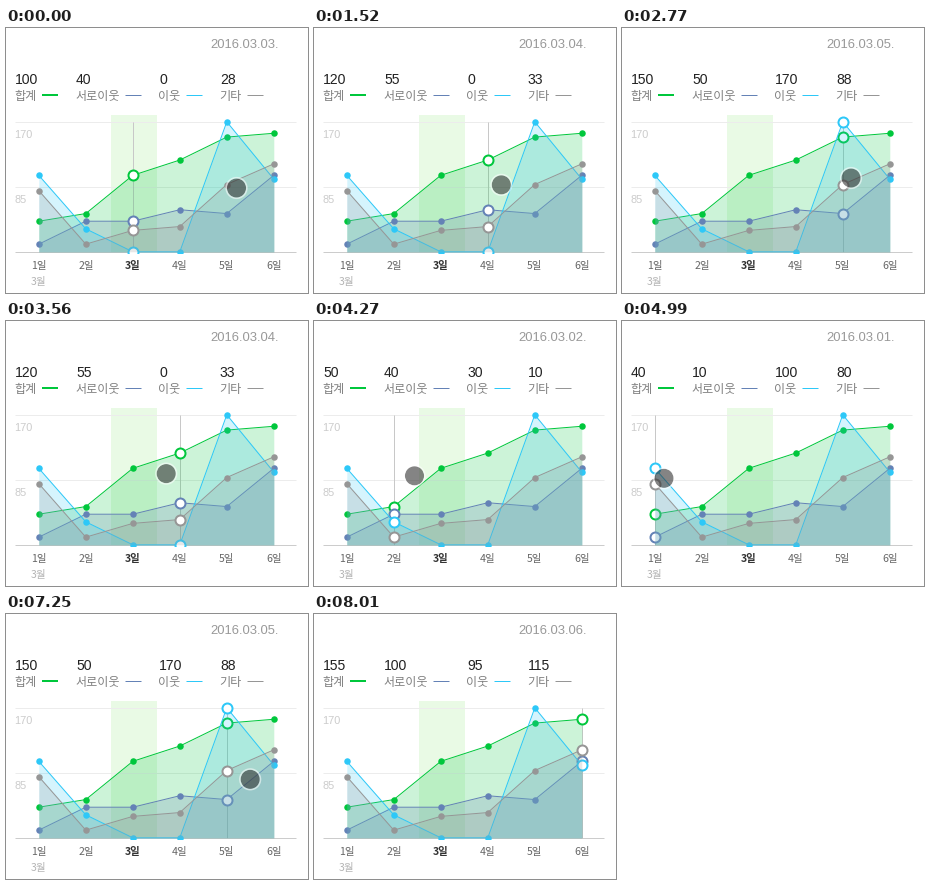
A matplotlib script that plays this animation: 302 px wide and 265 px high, repeating every 8400 ms.

```python
import matplotlib.pyplot as plt
import numpy as np
from matplotlib.animation import FuncAnimation
from matplotlib.patches import Circle, Rectangle

W, H, DPI = 302, 265, 100
PT = 72 / DPI  # points per pixel
LOOP, STEP = 8400, 30
BASE, UNIT = 223.8, 65 / 85  # baseline and pixels per count

SANS, HANGUL = "Liberation Sans", "Noto Sans CJK JP"
DAYS = 32.8 + 47 * np.arange(6)
TODAY = 2
# label, label x, colour, area opacity, daily counts
SERIES = [
    ("합계", 9, "#00c73c", .20, [40, 50, 100, 120, 150, 155]),
    ("서로이웃", 70, "#6482b6", .22, [10, 40, 40, 55, 50, 100]),
    ("이웃", 153, "#2dc8f8", .20, [100, 30, 0, 0, 170, 95]),
    ("기타", 214, "#969696", .22, [80, 10, 28, 33, 88, 115]),
]

# the pointer rests between these glides: start ms, end ms, x reached
GLIDES = [
    (400, 620, 108), (810, 890, 123.5), (1040, 1130, 128.5),
    (1290, 2170, 274), (2410, 2890, 225), (3010, 3320, 180),
    (3440, 3860, 133), (3980, 4270, 100.5), (4540, 4990, 42),
    (5360, 5670, 95), (5830, 6690, 176), (6760, 6940, 233),
    (7140, 7480, 257), (7780, 8010, 268),
]
START = 230.5, 160
HOVER_FROM = 1290
EASE = np.array([1.8, 3])  # ease-out powers across and down


def resting_y(t):
    """The pointer drifts up, slowly down again, then leaves the stage."""
    return np.interp(t, [1130, 2170, 2890, 7480, 8010],
                     [163.5, 152, 150, 166, H + 13])


def pointer_at(t):
    pos = np.array(START, float)
    for t0, t1, x in GLIDES:
        u = np.clip((t - t0) / (t1 - t0), 0, 1)
        pos += ((x, resting_y(t1)) - pos) * (1 - (1 - u) ** EASE)
    return pos


def day_at(t, x):
    return TODAY if t < HOVER_FROM else int(np.argmin(abs(DAYS - x)))


def height(counts):
    return BASE - UNIT * np.asarray(counts, float)


fig = plt.figure(figsize=(W / DPI, H / DPI), dpi=DPI, facecolor="white")
ax = fig.add_axes([0, 0, 1, 1])
ax.set_xlim(0, W)
ax.set_ylim(H, 0)
ax.axis("off")


def write(x, y, s, px, color, font=SANS, **kw):
    return ax.text(x, y, s, fontsize=px * PT, color=color, family=font,
                   va="baseline", **kw)


def rule(xs, ys, color, px=1, z=1):
    return ax.plot(xs, ys, color=color, lw=px * PT, zorder=z,
                   solid_capstyle="butt")[0]


# grid, highlighted day and axis labels
ax.add_patch(Rectangle((105, 87), 46, 137, fc="#e9fae5", lw=0, zorder=0))
for count in (0, 85, 170):
    y = 223.5 - UNIT * count
    rule([9, 290], [y, y], "#ececec" if count else "#cccccc")
    if count:
        write(8.5, y + 16.5, str(count), 11, "#cccccc")
for i, x in enumerate(DAYS):
    color, weight = ("#333333", "bold") if i == TODAY else ("#666666", "normal")
    write(x, 241, f"{i + 1}일", 10.5, color, HANGUL, ha="center", weight=weight)
write(DAYS[0], 257, "3월", 10.5, "#b4b4b4", HANGUL, ha="center")

guide = rule([0, 0], [94, BASE], "#c8c8c8", z=2)
date = write(204.5, 19.5, "", 13, "#999999")

# areas, lines, dots and the enlarged marker of the chosen day
plot_box = Rectangle((0, 0), W, 225, transform=ax.transData)
markers, totals = [], []
for k, (name, x, color, alpha, counts) in enumerate(SERIES):
    z = 3 + 3 * k
    ys = height(counts)
    ax.fill_between(DAYS, ys, BASE, color=color, alpha=alpha, lw=0, zorder=z)
    line, = ax.plot(DAYS, ys, "o-", color=color, lw=PT, ms=6.5 * PT, mew=0,
                    zorder=z + 1)
    mark, = ax.plot([], [], "o", mfc="white", mec=color, ms=10 * PT,
                    mew=2 * PT, zorder=z + 2)
    for artist in (line, mark):
        artist.set_clip_path(plot_box)
    markers.append(mark)
    totals.append(write(x, 56, "", 14, "#222222"))
    write(x - .6, 72, name, 12.1, "#808080", HANGUL)
    dash = x + 5 + 11 * len(name)
    px = 1 if k else 2
    rule([dash, dash + 16], [66 + px / 2] * 2, color, px)

disc = Circle(START, 9.6, fc=(.2, .2, .2, .6), lw=0, zorder=29)
ring = Circle(START, 10.3, fc="none", ec=(1, 1, 1, .55), lw=1.6 * PT, zorder=30)
ax.add_patch(disc)
ax.add_patch(ring)


def draw(i):
    t = i * STEP + 10
    pos = pointer_at(t)
    day = day_at(t, pos[0])
    disc.center = ring.center = tuple(pos)
    guide.set_xdata([DAYS[day]] * 2)
    date.set_text(f"2016.03.{day + 1:02d}.")
    for mark, total, (*_, counts) in zip(markers, totals, SERIES):
        mark.set_data([DAYS[day]], [height(counts[day])])
        total.set_text(str(counts[day]))
    return [disc, ring, guide, date, *markers, *totals]


anim = FuncAnimation(fig, draw, frames=LOOP // STEP, interval=STEP,
                     repeat=True, repeat_delay=0, blit=False)
plt.show()
```
